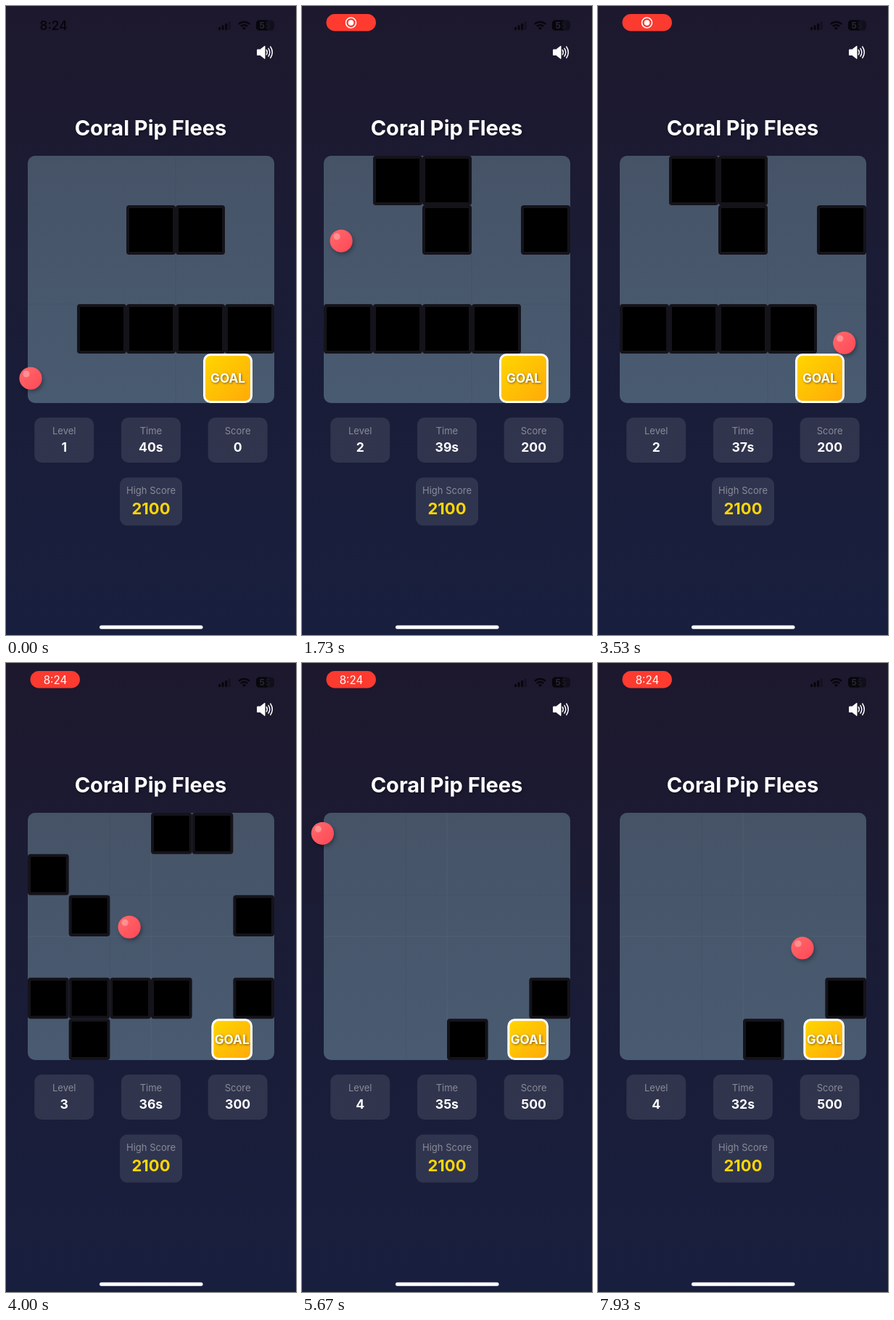
An HTML page that plays this animation: 400x865 px, repeating every 8 s.

```html
<!DOCTYPE html>
<html lang="en">
<head>
<meta charset="utf-8">
<title>Coral Pip Flees</title>
<style>
  html, body { margin: 0; width: 100%; height: 100%; overflow: hidden; background: #1a1c35; }
  svg { display: block; width: 100%; height: 100%; font-family: Inter, Roboto, sans-serif; }
  text { text-anchor: middle; }
  .title { font-size: 29px; font-weight: 700; fill: #fff; filter: drop-shadow(2px 2px 2px rgba(0,0,0,.3)); }
  .label { font-size: 13px; fill: #898b98; }
  .value { font-size: 17.6px; font-weight: 700; fill: #fff; }
  .best { font-size: 22px; font-weight: 700; fill: #ffd700; }
  .card { fill: #fff; fill-opacity: .1; }
  .goal text { font-size: 17.2px; font-weight: 700; fill: #fff; filter: drop-shadow(1px 1px 1.5px rgba(0,0,0,.5)); }
  #ball { filter: drop-shadow(2px 3px 2.5px rgba(0,0,0,.3)); }
</style>
</head>
<body>
<svg viewBox="0 0 400 865">
  <defs>
    <linearGradient id="sky" x2="0" y2="1">
      <stop stop-color="#1d182d"/><stop offset=".3" stop-color="#1b1b33"/><stop offset="1" stop-color="#181f3e"/>
    </linearGradient>
    <linearGradient id="slate" x2="0" y2="1">
      <stop stop-color="#465367"/><stop offset="1" stop-color="#495b71"/>
    </linearGradient>
    <linearGradient id="gold" x2="1" y2="1">
      <stop stop-color="#ffd700"/><stop offset="1" stop-color="#ffa908"/>
    </linearGradient>
    <linearGradient id="coral" x2="1" y2="1">
      <stop stop-color="#ff6b6b"/><stop offset="1" stop-color="#ff4757"/>
    </linearGradient>
  </defs>
  <rect width="400" height="865" fill="url(#sky)"/>

  <!-- status bar -->
  <text id="clock" x="65.5" y="33" font-size="17" font-weight="600" fill="#07060b">8:24</text>
  <rect id="pill" x="33.5" y="11" width="68.500" height="23.500" rx="11.750" fill="#ff3b30"/>
  <g id="record">
    <circle cx="67.5" cy="23" r="7" fill="none" stroke="#fff" stroke-width="1.6"/>
    <circle cx="67.5" cy="23" r="3.8" fill="#fff"/>
  </g>
  <text id="pillClock" x="68" y="28.5" font-size="15.2" fill="#fff">8:24</text>
  <g fill="#07060b">
    <g id="signal"></g>
    <path d="M328.5 33l-2.6-2.8a3.8 3.8 0 0 1 5.2 0z"/>
    <path d="M323.8 28a6.8 6.8 0 0 1 9.4 0M321 25a10.6 10.6 0 0 1 15 0" fill="none" stroke="#07060b" stroke-width="2.4"/>
    <rect x="345" y="19.5" width="25" height="14" rx="4.5" opacity=".5"/>
    <path d="M360 19.5v14h-10.5a4.5 4.5 0 0 1-4.5-4.5v-5a4.5 4.5 0 0 1 4.5-4.5z"/>
    <text x="357" y="31" font-size="12" font-weight="700" fill="#292637">5<tspan fill-opacity=".4">5</tspan></text>
  </g>

  <!-- sound button -->
  <path d="M346.5 60h4l6.5-5v17.5l-6.5-5h-4z" fill="#fff" stroke="#fff" stroke-linejoin="round"/>
  <path d="M359.3 60.5q2 3.2 0 6.4M362 58.3q3.5 5.4 0 10.8M364.8 56q5 7.7 0 15.4" fill="none" stroke="#fff" stroke-width="1.5" stroke-linecap="round"/>

  <text class="title" x="199.5" y="178">Coral Pip Flees</text>
  <rect x="30" y="206" width="340" height="340" rx="10" fill="url(#slate)"/>
  <g id="board"></g>
  <g id="cards"></g>
  <rect class="card" x="157" y="648.5" width="86" height="66" rx="10"/>
  <text class="label" x="200" y="671">High Score</text>
  <text class="best" x="200" y="699">2100</text>
  <rect x="129" y="851.8" width="142.5" height="5" rx="2.5" fill="#fff"/>

  <g id="ball">
    <circle r="15.6" fill="url(#coral)"/>
    <circle cx="-6" cy="-6" r="4.6" fill="#fff" fill-opacity=".3"/>
  </g>
</svg>
<script>
const LOOP = 8000, BOARD = { x: 30, y: 206, size: 340 };
const $ = id => document.getElementById(id);

// The ball rests in the first column of its row until `go`, then glides through [time, x, y].
const levels = [
  { start: 0, score: 0, row: 4, go: 70,
    map: ['.....', '..##.', '.....', '.####', '.....'],
    path: [[550, 268, 512]] },
  { start: 560, score: 200, row: 0, go: 560,
    map: ['.##..', '..#.#', '.....', '####.', '.....'],
    path: [[870, 50, 285], [1730, 54, 323], [2730, 195, 380], [3330, 346, 420], [3600, 334, 480]] },
  { start: 3600, score: 300, row: 0, go: 3600,
    map: ['...##.', '#.....', '.#...#', '......', '####.#', '.#....'],
    path: [[3780, 150, 250], [4000, 170, 363], [5200, 285, 412], [5450, 292, 475]] },
  { start: 5450, score: 500, row: 0, go: 5950,
    map: ['......', '......', '......', '......', '.....#', '...#..'],
    path: [[6870, 105.6, 467.3], [7930, 282, 392]] }
];

for (const level of levels) {
  level.cell = BOARD.size / level.map.length;
  level.path.unshift([level.go, level.cell / 2, BOARD.y + level.cell * (level.row + .5)]);
}

const rect = (x, y, w, h, r, attrs) =>
  `<rect x="${x}" y="${y}" width="${w}" height="${h}" rx="${r}" ${attrs}/>`;

function seam(offset, color) {
  const { x, y, size } = BOARD;
  return `<path d="M${x + offset} ${y}v${size}M${x} ${y + offset}h${size}" stroke="${color}" stroke-opacity=".05"/>`;
}

function boardMarkup({ cell, map }) {
  const tile = (col, row) => rect(BOARD.x + col * cell + 2, BOARD.y + row * cell + 2, cell - 4, cell - 4, 2,
    'fill="#000" stroke="#15131a" stroke-width="4"');
  const walls = map.map((line, row) =>
    [...line].map((mark, col) => mark === '#' ? tile(col, row) : '').join('')).join('');
  const seams = map.length === 5 ? seam(3 * cell, '#000') : seam(2 * cell, '#000') + seam(3 * cell, '#fff');
  const gx = BOARD.size - cell, gy = BOARD.y + BOARD.size - cell;
  return seams + walls + '<g class="goal">' +
    rect(gx + 1.5, gy + 1.5, cell - 3, cell - 3, 8.5, 'fill="url(#gold)" stroke="#fff" stroke-width="3"') +
    `<text x="${gx + cell / 2}" y="${gy + cell / 2 + 6.2}">GOAL</text></g>`;
}

for (let i = 0; i < 4; i++) {
  const h = 4 + 2.5 * i;
  $('signal').innerHTML += rect(293 + 4.6 * i, 33 - h, 3, h, 1, `opacity="${i < 3 ? 1 : .35}"`);
}

$('cards').innerHTML = ['Level', 'Time', 'Score'].map((name, i) => {
  const x = 80.2 + i * 119.7;
  return rect(x - 41, 566, 82, 62, 10, 'class="card"') +
    `<text class="label" x="${x}" y="589">${name}</text>` +
    `<text class="value" id="v${name}" x="${x}" y="613.3"></text>`;
}).join('');

// Smooth cubic curve through timed points, held at both ends.
function glide(path, t) {
  const last = path.length - 1;
  if (t <= path[0][0]) return path[0].slice(1);
  if (t >= path[last][0]) return path[last].slice(1);
  const i = path.findIndex(p => p[0] > t) - 1;
  const slope = (k, axis) => {
    const a = path[Math.max(k - 1, 0)], b = path[Math.min(k + 1, last)];
    return (b[axis] - a[axis]) / (b[0] - a[0]);
  };
  const span = path[i + 1][0] - path[i][0], u = (t - path[i][0]) / span, v = 1 - u;
  return [1, 2].map(axis =>
    path[i][axis] * v * v * (1 + 2 * u) + path[i + 1][axis] * u * u * (3 - 2 * u) +
    span * u * v * (v * slope(i, axis) - u * slope(i + 1, axis)));
}

const show = (id, on) => $(id).setAttribute('visibility', on ? 'visible' : 'hidden');
let shown;

function draw(t) {
  const level = levels.findLast(l => l.start <= t);
  if (level !== shown) {
    $('board').innerHTML = boardMarkup(level);
    $('vLevel').textContent = levels.indexOf(level) + 1;
    $('vScore').textContent = level.score;
    shown = level;
  }
  $('vTime').textContent = 40 - Math.floor((t + 134) / 1000) + 's';
  $('ball').setAttribute('transform', `translate(${glide(level.path, t)})`);

  const recording = t >= 350, showTime = t >= 3600;
  show('clock', !recording);
  show('pill', recording);
  show('record', recording && !showTime);
  show('pillClock', showTime);
  const dim = (1 + Math.cos((t - 2730) / 2070 * 2 * Math.PI)) / 2;
  $('pill').setAttribute('opacity', 1 - .13 * dim);
}

const begin = performance.now();
function tick() {
  draw((performance.now() - begin) % LOOP);
  requestAnimationFrame(tick);
}
draw(0);
requestAnimationFrame(tick);
</script>
</body>
</html>
```
